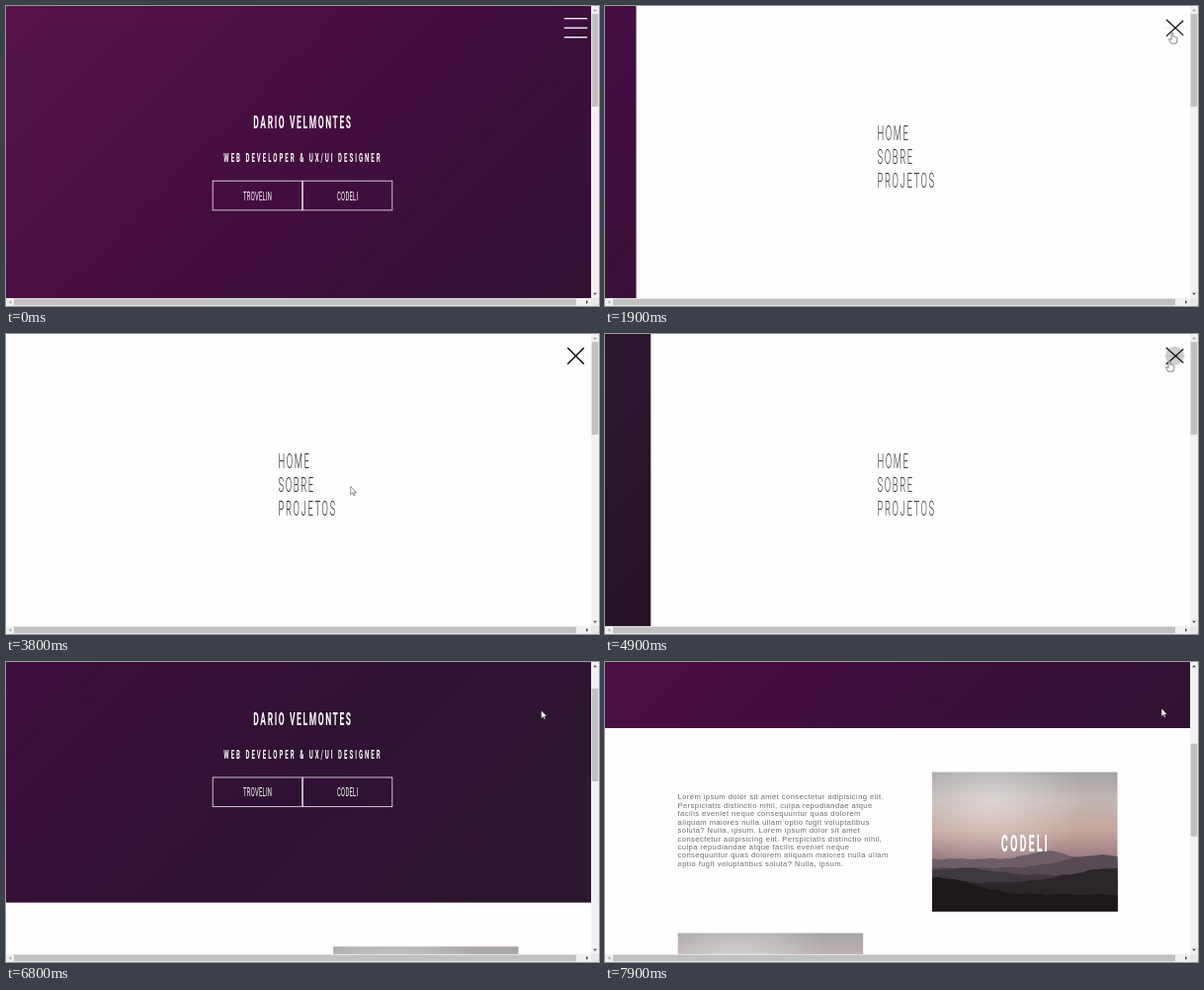
An HTML page for the animation above (8000 ms loop, 600 by 304 pixels).

```html
<!DOCTYPE html>
<html lang="pt">
<head>
<meta charset="utf-8">
<title>Portfolio</title>
<style>
  html, body { margin: 0; width: 100%; height: 100%; overflow: hidden; background: #fefdff; }
  svg { display: block; width: 600px; height: 304px; }
  .narrow { font-family: Roboto, "Liberation Sans", sans-serif; }
  .copy { font: 7.6px "Liberation Sans", Arial, sans-serif; letter-spacing: .43px; fill: #6c6c6c; }
</style>
</head>
<body>
<svg id="stage" viewBox="0 0 600 304" xmlns="http://www.w3.org/2000/svg">
  <defs>
    <linearGradient id="dusk" gradientUnits="userSpaceOnUse">
      <stop offset="0" stop-color="#581448"/>
      <stop offset=".22" stop-color="#430e3f"/>
      <stop offset=".42" stop-color="#301234"/>
      <stop offset=".6" stop-color="#2d1830"/>
      <stop offset=".75" stop-color="#260f22"/>
      <stop offset="1" stop-color="#200d1c"/>
    </linearGradient>
    <linearGradient id="sky" x2="0" y2="1">
      <stop offset="0" stop-color="#a6a3a5"/>
      <stop offset=".2" stop-color="#c2b7b4"/>
      <stop offset=".42" stop-color="#c4a69c"/>
      <stop offset=".56" stop-color="#a88889"/>
      <stop offset=".72" stop-color="#7d6a74"/>
    </linearGradient>
    <radialGradient id="glow" cx=".32" cy=".22" r=".5">
      <stop offset="0" stop-color="#fff" stop-opacity=".42"/>
      <stop offset="1" stop-color="#fff" stop-opacity="0"/>
    </radialGradient>
    <clipPath id="view"><rect width="592" height="296"/></clipPath>
    <clipPath id="panelClip"><rect id="panelEdge" width="592" height="296"/></clipPath>
    <g id="photo">
      <rect width="187.5" height="141" fill="url(#sky)"/>
      <rect width="187.5" height="141" fill="url(#glow)"/>
    </g>
  </defs>

  <rect width="600" height="304" fill="#fefdff"/>
  <g clip-path="url(#view)">
    <g id="page">
      <rect width="600" height="304" fill="url(#dusk)"/>
      <g id="hero"></g>
      <g fill="none" stroke="#e9e0ea" stroke-width=".85">
        <rect x="209.2" y="177.2" width="90.5" height="29.7"/>
        <rect x="300.3" y="177.2" width="90.5" height="29.7"/>
      </g>
      <g id="copy" class="copy"></g>
      <use href="#photo" x="331" y="348.6"/>
      <use href="#photo" x="73.7" y="511.7"/>
      <g id="cardLabel"></g>
    </g>
    <g clip-path="url(#panelClip)">
      <rect width="592" height="296" fill="#fefdff"/>
      <g id="menu"></g>
    </g>
    <g id="toggle">
      <circle id="press" cx="576.5" cy="22" r="9.5" fill="#cfcfd1"/>
      <g id="bars" stroke-width="1.3">
        <path d="M-11.7 0H11.7"/><path d="M-11.7 0H11.7"/><path d="M-11.7 0H11.7"/>
      </g>
    </g>
  </g>

  <path d="M592 0h8v304H0v-8h592z" fill="#f1f1f1"/>
  <rect x="592" y="296" width="8" height="8" fill="#e6e6e6"/>
  <rect x="8" y="296.7" width="569" height="6.6" fill="#c1c1c1"/>
  <rect id="thumb" x="592.7" width="6.6" height="94" fill="#c1c1c1"/>
  <path id="upArrow" d="M594 5.2l2-2.2 2 2.2z"/>
  <path d="M594 290.8l2 2.2 2-2.2z" fill="#505050"/>
  <path d="M5.2 298l-2.2 2 2.2 2z" fill="#a3a3a3"/>
  <path d="M587 298l2.2 2-2.2 2z" fill="#505050"/>

  <g id="cursor" stroke-linejoin="round">
    <path id="arrow" d="M0 0V8.2L1.9 6.5 3.1 9.2 4.4 8.6 3.2 6H5.8z" fill="#fff" stroke="#222" stroke-width=".5"/>
    <path id="hand" d="M-.9 .7Q0-.5 .9 .7V4Q2 3.3 2.5 4.4 3.5 3.9 4 4.9 5 4.6 5 5.8V8L4 11H-1.2L-3.4 7.2Q-3.6 5.8-2.3 6.2L-.9 7.4z" fill="#fff" stroke="#333" stroke-width=".6"/>
  </g>
</svg>

<script>
const LOOP = 8000;
const SVG = "http://www.w3.org/2000/svg";
const $ = id => document.getElementById(id);
const clamp = v => Math.min(1, Math.max(0, v));
const set = (el, attrs) => { for (const k in attrs) el.setAttribute(k, attrs[k]); return el; };
const add = (parent, tag, attrs) => parent.appendChild(set(document.createElementNS(SVG, tag), attrs));

// Tall narrow lettering: every label shares the same condensing factor.
function label(parent, text, x, y, size, weight, spacing, fill, anchor = "middle") {
  add(parent, "text", {
    class: "narrow", transform: `translate(${x} ${y}) scale(.45 1)`, fill,
    "font-size": size, "font-weight": weight, "letter-spacing": spacing, "text-anchor": anchor
  }).textContent = text;
}

label($("hero"), "DARIO VELMONTES", 300.5, 124, 18.8, 600, 3.6, "#fff");
label($("hero"), "WEB DEVELOPER & UX/UI DESIGNER", 300.5, 157.8, 13.4, 700, 4.5, "#fff");
label($("hero"), "TROVELIN", 254.7, 196.5, 13, 400, .6, "#fff");
label($("hero"), "CODELI", 345.7, 196.5, 13, 400, .6, "#fff");
label($("cardLabel"), "CODELI", 425.3, 428.5, 24, 600, 4.6, "#fff");
["HOME", "SOBRE", "PROJETOS"].forEach((item, i) =>
  label($("menu"), item, 275.5, 136 + 24 * i, 21, 300, 3.6, "#2c2c2c", "start"));

[
  "Lorem ipsum dolor sit amet consectetur adipisicing elit.",
  "Perspiciatis distinctio nihil, culpa repudiandae atque",
  "facilis eveniet neque consequuntur quas dolorem",
  "aliquam maiores nulla ullam optio fugit voluptatibus",
  "soluta? Nulla, ipsum. Lorem ipsum dolor sit amet",
  "consectetur adipisicing elit. Perspiciatis distinctio nihil,",
  "culpa repudiandae atque facilis eveniet neque",
  "consequuntur quas dolorem aliquam maiores nulla ullam",
  "optio fugit voluptatibus soluta? Nulla, ipsum."
].forEach((line, i) =>
  add($("copy"), "text", { x: 73.5, y: 376.4 + 8.44 * i }).textContent = line);

function ridge(fill, base, peak, peakX, spread, wobble) {
  let d = "M0 141";
  for (let x = 0; x <= 187.5; x += 3.75) {
    const bump = peak * Math.exp(-(((x - peakX) / spread) ** 2));
    const rough = wobble * (Math.sin(x * .19 + base) + .6 * Math.sin(x * .43 + peakX));
    d += `L${x} ${(base - bump + rough).toFixed(1)}`;
  }
  add($("photo"), "path", { d: d + "L187.5 141z", fill });
}
ridge("#6d5e68", 88, 8, 117, 26, .4);
ridge("#574c56", 97, 13, 170, 50, .4);
ridge("#40383f", 104, 7, 30, 40, .5);
ridge("#2c2529", 112, 15, 187, 62, .5);
ridge("#1d181a", 124, 17, 8, 48, .6);

function ease(x) {
  const bez = (a, b, s) => 3 * a * s * (1 - s) ** 2 + 3 * b * s * s * (1 - s) + s ** 3;
  let lo = 0, hi = 1;
  for (let i = 0; i < 20; i++) {
    const mid = (lo + hi) / 2;
    if (bez(.25, .25, mid) < x) lo = mid; else hi = mid;
  }
  return bez(.1, 1, lo);
}

// Keys are [time, ...values]; values are interpolated linearly.
function track(keys, t) {
  if (t <= keys[0][0]) return keys[0].slice(1);
  for (let i = 1; i < keys.length; i++) {
    const a = keys[i - 1], b = keys[i];
    if (t < b[0]) {
      const k = (t - a[0]) / (b[0] - a[0]);
      return a.slice(1).map((v, j) => v + (b[j + 1] - v) * k);
    }
  }
  return keys[keys.length - 1].slice(1);
}

const scrollKeys = [[6715, 0], [6800, 60], [7300, 187], [7600, 232], [7750, 237]];
const cursorKeys = [
  [1000, 576, 61], [1290, 576, 61], [1300, 574, 27], [1900, 574, 27], [2400, 570, 31],
  [2500, 570, 31], [3200, 294, 128], [3400, 294, 128], [3700, 298, 186], [4200, 549, 30],
  [4600, 571, 27], [5700, 571, 27], [6600, 541.5, 49], [7600, 541.5, 49], [7900, 563, 47]
];
const bars = [...$("bars").children];

function draw(t) {
  const shift = 678 * (1 - Math.cos(2 * Math.PI * (t - 450) / LOOP)) / 2;
  set($("dusk"), { x1: -shift, y1: -shift, x2: 1130 - shift, y2: 1130 - shift });

  const [scroll] = track(scrollKeys, t);
  for (const id of ["page", "toggle"]) set($(id), { transform: `translate(0 ${-scroll})` });
  set($("thumb"), { y: 8 + scroll * .315 });
  set($("upArrow"), { fill: scroll > 0 ? "#505050" : "#a3a3a3" });

  const open = ease(clamp((t - 1330) / 800)) - ease(clamp((t - 4830) / 800));
  set($("panelEdge"), { x: 592 * (1 - open) });
  set($("menu"), { opacity: open });

  const shade = Math.round(255 * (1 - open));
  set($("bars"), { stroke: `rgb(${shade},${shade},${shade})` });
  bars.forEach((bar, i) => {
    const side = i - 1;
    const y = 22.2 + side * 9.5 * (1 - open);
    set(bar, { transform: `translate(576.5 ${y}) rotate(${-side * 45 * open})` });
  });
  set(bars[1], { opacity: 1 - open });
  set($("press"), { opacity: t < 4830 ? 0 : clamp((5100 - t) / 200) });

  const [x, y] = track(cursorKeys, t);
  const pointing = (x > 565 && y < 34) || x < 336;
  set($("cursor"), { transform: `translate(${x} ${y})`, visibility: t < 1000 ? "hidden" : "visible" });
  set($("hand"), { opacity: pointing ? 1 : 0 });
  set($("arrow"), { opacity: pointing ? 0 : 1 });
}

const start = performance.now();
function tick() {
  draw((performance.now() - start) % LOOP);
  requestAnimationFrame(tick);
}
tick();
</script>
</body>
</html>
```
